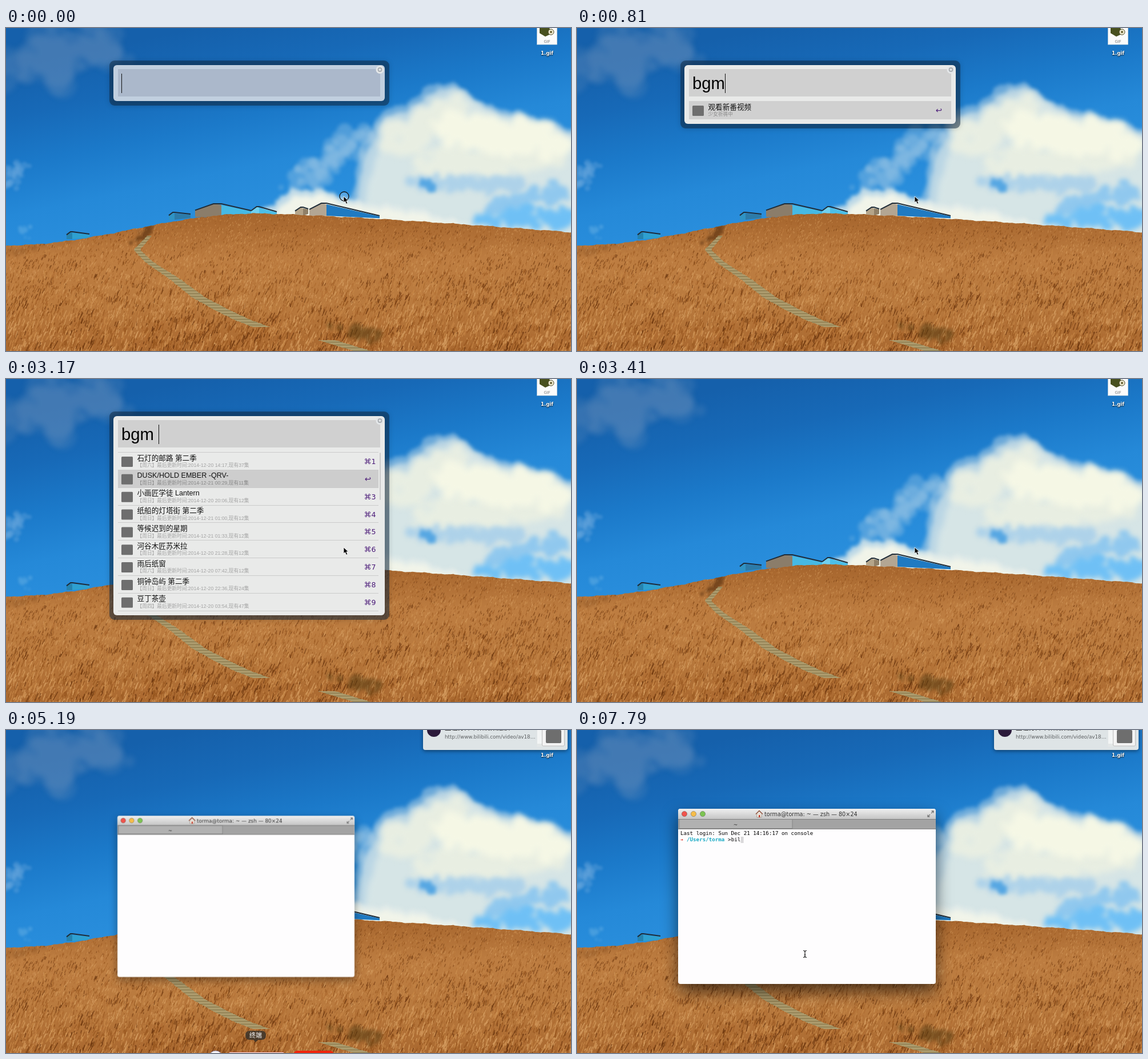
An HTML page with a canvas that plays this animation: 989x566 px, repeating every 8000 ms.

```html
<!DOCTYPE html>
<html lang="zh">
<head>
<meta charset="utf-8">
<title>Desktop</title>
<style>
html, body { margin: 0; width: 100%; height: 100%; overflow: hidden; background: #1c74c2; }
canvas, svg { position: absolute; left: 0; top: 0; width: 989px; height: 566px; }
text { font-family: "Liberation Sans", "Noto Sans CJK SC", "Noto Sans CJK", sans-serif; white-space: pre; }
.ui { font-family: "DejaVu Sans", "Noto Sans CJK SC", sans-serif; }
.mono { font-family: "DejaVu Sans Mono", monospace; font-size: 9.2px; }
.t { animation: 8s step-end -4ms infinite; }

/* search panel */
#panel { animation-name: panel; }
.band { x: 181px; y: 57px; width: 490px; height: calc(var(--h) + 16px); fill: rgba(14, 38, 62, .5); filter: drop-shadow(0 1px 4px rgba(0, 0, 0, .3)); }
.face { x: 188px; y: 65px; width: 475px; height: var(--h); fill: var(--face); }
.field { fill: var(--field); }
.query { font-size: 29.3px; }
#b { animation-name: key-b; } #g { animation-name: key-g; } #m { animation-name: key-m; }
#caret { animation-name: caret; }
#list { animation-name: list; } #single { animation-name: single; }
#sel { animation-name: sel; }
#r0 { animation-name: leave; } #r1 { animation-name: enter; }
.title { font-size: 12.6px; fill: #111; }
.sub { font-size: 8.7px; fill: var(--s, #a3a3a3); }
.short { font: 12.5px "DejaVu Sans", sans-serif; fill: #4a1a78; text-anchor: end; opacity: var(--k, 1); }
.ret { font: 13.5px "DejaVu Sans", sans-serif; fill: #4a1a78; }

@keyframes panel {
  0% { --h: 63px; --face: #c1cfdf; --field: #abb8cb; opacity: 1; }
  1.5% { --face: #e9eae9; --field: #d0d0d0; }
  5.25% { --h: 349px; }
  10.125% { --h: 103px; }
  12% { --h: 349px; }
  42.625% { opacity: 0; }
  100% { --h: 63px; --face: #e9eae9; --field: #d0d0d0; opacity: 0; }
}
@keyframes key-b { 0% { opacity: 0; } 5.25%, 100% { opacity: 1; } }
@keyframes key-g { 0% { opacity: 0; } 7.125%, 100% { opacity: 1; } }
@keyframes key-m { 0% { opacity: 0; } 8.625%, 100% { opacity: 1; } }
@keyframes caret {
  0% { transform: translateX(0); opacity: 1; }
  5.25% { transform: translateX(16.5px); }
  7.125% { transform: translateX(33px); }
  8.625% { transform: translateX(57px); }
  12% { transform: translateX(65px); }
  18.625% { opacity: 0; }
  26.125% { opacity: 1; }
  33.625% { opacity: 0; }
  39.625%, 100% { opacity: 1; transform: translateX(65px); }
}
@keyframes list { 0% { opacity: 0; } 5.25% { opacity: 1; } 10.125% { opacity: 0; } 12%, 100% { opacity: 1; } }
@keyframes single { 0% { opacity: 0; } 10.125% { opacity: 1; } 12%, 100% { opacity: 0; } }
@keyframes sel { 0% { transform: none; } 21.625%, 100% { transform: translateY(30.85px); } }
@keyframes leave { 0% { --k: 0; --s: #868686; } 21.625%, 100% { --k: 1; --s: #a3a3a3; } }
@keyframes enter { 0% { --k: 1; --s: #a3a3a3; } 21.625%, 100% { --k: 0; --s: #868686; } }

/* pointer */
#ring { animation-name: ring; } #arrow { animation-name: arrow; } #beam { animation-name: beam; }
@keyframes ring { 0% { opacity: 1; } 1.5%, 100% { opacity: 0; } }
@keyframes arrow {
  0% { transform: translate(591px, 295px); opacity: 1; }
  48.625% { transform: translate(584px, 434px); }
  50.5%, 100% { opacity: 0; transform: translate(584px, 434px); }
}
@keyframes beam { 0% { opacity: 0; } 72%, 100% { opacity: 1; } }

/* notification and dock */
#note { animation-name: note; } #dock { animation-name: dock; } #tip { animation-name: tip; }
.card { filter: drop-shadow(0 2px 3px rgba(0, 0, 0, .45)); }
@keyframes note {
  0% { transform: translateX(270px); }
  50.5% { transform: translateX(150px); }
  52% { transform: translateX(25px); }
  54.25%, 100% { transform: none; }
}
@keyframes dock {
  0% { transform: translateY(12px); }
  54.25% { transform: translateY(2px); }
  55.75% { transform: none; }
  72%, 100% { transform: translateY(12px); }
}
@keyframes tip { 0% { opacity: 0; } 58% { opacity: 1; } 70.125%, 100% { opacity: 0; } }

/* terminal */
#term { animation-name: term; transform-origin: 403px 292px; }
#frame { animation-name: shade; }
#login { animation-name: login; } #prompt { animation-name: prompt; }
#bi { animation-name: key-i; } #l { animation-name: key-l; } #block { animation-name: block; }
@keyframes term {
  0% { opacity: 0; transform: scale(.3); }
  61.875% { opacity: .5; }
  63.375% { opacity: .8; transform: scale(.65); }
  64.875% { opacity: 1; transform: scale(.92); }
  66.375%, 100% { opacity: 1; transform: none; }
}
@keyframes shade {
  0% { filter: drop-shadow(0 6px 8px rgba(0, 0, 0, .4)); }
  68.25%, 100% { filter: drop-shadow(0 13px 14px rgba(0, 0, 0, .6)); }
}
@keyframes login { 0% { opacity: 0; } 68.25%, 100% { opacity: 1; } }
@keyframes prompt { 0% { opacity: 0; } 70.125%, 100% { opacity: 1; } }
@keyframes key-i { 0% { opacity: 0; } 94.875%, 100% { opacity: 1; } }
@keyframes key-l { 0% { opacity: 0; } 97.375%, 100% { opacity: 1; } }
@keyframes block {
  0% { transform: none; }
  94.875% { transform: translateX(11px); }
  97.375%, 100% { transform: translateX(16.6px); }
}
</style>
</head>
<body>
<canvas id="scene" width="989" height="566"></canvas>
<svg viewBox="0 0 989 566">
  <defs>
    <linearGradient id="bar" x2="0" y2="1"><stop stop-color="#f0f0f0"/><stop offset="1" stop-color="#c2c2c2"/></linearGradient>
  </defs>

  <g id="file">
    <rect x="929.5" y="-10" width="35" height="39" fill="#fbfbfb" stroke="#c9d3da" stroke-width=".7"/>
    <path d="M934 0h17l6 9-13 6-10-6z" fill="#48501f"/>
    <circle cx="954" cy="7" r="5" fill="#eee9d0" stroke="#4e4a2a"/><circle cx="954" cy="7" r="2" fill="#6a6335"/>
    <text class="ui" x="947" y="26" font-size="6.8" fill="#777" text-anchor="middle">GIF</text>
    <text class="ui" x="947" y="47" font-size="8.6" font-weight="bold" fill="#fff" text-anchor="middle" style="text-shadow:0 1px 2px #000">1.gif</text>
  </g>

  <g id="panel" class="t">
    <rect class="band" rx="9"/>
    <rect class="face" rx="6"/>
    <rect class="field" x="196" y="72" width="459" height="48"/>
    <circle cx="654.5" cy="73" r="7" fill="#e4e7e9"/>
    <circle cx="654.5" cy="73" r="3" fill="none" stroke="#a9adb2" stroke-width="1.8"/>
    <g class="query">
      <text id="b" class="t" x="202" y="107">b</text>
      <text id="g" class="t" x="218.3" y="107">g</text>
      <text id="m" class="t" x="234.6" y="107">m</text>
    </g>
    <rect id="caret" class="t" x="202" y="80" width="1" height="34" fill="#111"/>
    <g id="single" class="t" style="--s:#8c8c8c;--k:0">
      <rect x="196" y="128" width="459" height="32" fill="#d0d0d0"/>
      <text class="ret" x="628" y="149">↩</text>
    </g>
    <g id="list" class="t">
      <g id="sel" class="t">
        <rect x="196" y="128.5" width="456" height="31" fill="#cdcdcd"/>
        <text class="ret" x="628" y="149">↩</text>
      </g>
      <rect x="654" y="129" width="2" height="83" rx="1" fill="#cacaca"/>
    </g>
  </g>

  <g id="dock" class="t">
    <circle cx="367" cy="574" r="12" fill="#f4f2f6" stroke="#8a7c98"/>
    <rect x="390" y="564.5" width="97" height="10" rx="2" fill="#f7f1ec" stroke="#b5402a" stroke-width=".8"/>
    <rect x="503" y="562" width="71" height="20" rx="7" fill="#f0240c"/>
  </g>
  <g id="tip" class="t">
    <path d="M427 527h20q8 0 8 8t-8 8h-6l-4 4-4-4h-6q-8 0-8-8t8-8z" fill="#3f362c" fill-opacity=".88"/>
    <text x="437" y="539" font-size="11" fill="#fff" text-anchor="middle">终端</text>
  </g>

  <g id="note" class="t">
    <rect class="card" x="730" y="-40" width="253" height="75" rx="4" fill="#e6eaea" fill-opacity=".97"/>
    <circle cx="749" cy="0" r="12" fill="#2b1a3a"/>
    <text x="768" y="-.5" font-size="11.4" fill="#222">正在打开本集视频播放</text>
    <text class="ui" x="768" y="14.5" font-size="8.8" fill="#5c5f61">http://www.bilibili.com/video/av18…</text>
    <rect x="930" y="-5" width="8" height="29" fill="#fff" fill-opacity=".6"/>
    <rect x="938.5" y="-12" width="39" height="40" rx="2" fill="#f3f3f3" stroke="#bcbcbc"/>
    <rect x="945" y="0" width="27" height="23" rx="2" fill="#6e6e6e"/>
  </g>

  <g id="term" class="t">
    <rect id="frame" class="t" x="177" y="138" width="451" height="307" rx="4" fill="#fefdfe"/>
    <path d="M177 157v-15q0-4 4-4h443q4 0 4 4v15z" fill="url(#bar)"/>
    <g stroke-opacity=".45" stroke="#333" stroke-width=".8">
      <circle cx="188" cy="147" r="4.6" fill="#f0544c"/>
      <circle cx="204" cy="147" r="4.6" fill="#f6bd4a"/>
      <circle cx="220" cy="147" r="4.6" fill="#7cc452"/>
    </g>
    <path d="M315 147h8v6h-8z" fill="#f6efe4" stroke="#8b8078" stroke-width=".7"/>
    <path d="M313 147.5l6-6 6 6" fill="#e9e2da" stroke="#8a4a35" stroke-width="1.4"/>
    <path d="M318 149h2.5v4h-2.5z" fill="#c0392b"/>
    <text class="ui" x="328" y="151" font-size="9.7" fill="#333">torma@torma: ~ — zsh — 80×24</text>
    <path d="M620 146l4-4m-3.5 0h3.5v3.5M618 148l-4 4m3.5 0h-3.5v-3.5" fill="none" stroke="#777" stroke-width="1.3"/>
    <rect x="177" y="156" width="451" height="18" fill="#a3a3a3"/>
    <rect x="179" y="156.5" width="198" height="16" fill="#b1b1b1" stroke="#7d7d7d" stroke-width=".8"/>
    <path d="M177 156.5h451M177 173.5h451" stroke="#808080"/>
    <text class="ui" x="277.5" y="169" font-size="9" fill="#333" text-anchor="middle">~</text>
    <text id="login" class="t mono" x="181" y="184">Last login: Sun Dec 21 14:16:17 on console</text>
    <g id="prompt" class="t">
      <rect id="block" class="t" x="270" y="187" width="5" height="11" fill="#d9d8da"/>
      <text class="mono" x="181" y="195" fill="#d8281e" font-weight="bold" style="font-size:8px">➜</text>
      <text class="mono" x="192" y="195" fill="#17a9c4" font-weight="bold">/Users/torma</text>
      <text class="mono" x="264" y="195">&gt;</text>
      <text id="bi" class="t mono" x="269.7" y="195">bi</text>
      <text id="l" class="t mono" x="280.8" y="195">l</text>
    </g>
  </g>

  <circle id="ring" class="t" cx="592" cy="295" r="8" fill="#fff" fill-opacity=".2" stroke="#111" stroke-width="1.3"/>
  <path id="arrow" class="t" d="M0 0v11l2.6-2.4 2 4.6 2.2-1-2-4.4h3.5z" fill="#000" stroke="#fff" stroke-width=".8"/>
  <path id="beam" class="t" d="M396 386.5q3 0 3 2.5 0-2.5 3-2.5M399 389v7M396 398.5q3 0 3-2.5 0 2.5 3 2.5M397.5 394h3" fill="none" stroke="#222" stroke-width="1.2"/>
</svg>

<script>
function add(parent, tag, attrs, text) {
  const el = document.createElementNS('http://www.w3.org/2000/svg', tag);
  for (const k in attrs) el.setAttribute(k, attrs[k]);
  if (text) el.textContent = text;
  return parent.appendChild(el);
}

// result rows
function addRow(parent, y, title, sub) {
  add(parent, 'rect', { x: 202, y: y + 8, width: 20, height: 18, rx: 1.5, fill: '#6e6e6e' });
  add(parent, 'text', { class: 'title', x: 229.5, y: y + 14.6 }, title);
  add(parent, 'text', { class: 'sub', x: 229.5, y: y + 26.2 }, sub);
}
const rows = [
  ['石灯的邮路 第二季', '周六', '20 14:17', 37],
  ['DUSK/HOLD EMBER -QRV-', '周日', '21 00:29', 11],
  ['小画匠学徒 Lantern', '周日', '20 20:06', 12],
  ['纸船的灯塔街 第二季', '周日', '21 01:00', 12],
  ['等候迟到的星期', '周日', '21 01:33', 12],
  ['河谷木匠苏米拉', '周日', '20 21:28', 12],
  ['雨后纸窗', '周六', '20 07:42', 12],
  ['铜钟岛屿 第二季', '周日', '20 22:36', 24],
  ['豆丁茶壶', '周四', '20 03:54', 47]
];
const list = document.getElementById('list');
for (let i = 0; i <= rows.length; i++) {
  add(list, 'path', { d: `M196 ${Math.round(128 + i * 30.85) + .5}h456`, stroke: '#cbcbcb' });
}
rows.forEach(([title, day, time, count], i) => {
  const y = 128 + i * 30.85, g = add(list, 'g', { id: 'r' + i, class: 't' });
  addRow(g, y, title, `【${day}】最后更新时间:2014-12-${time},现有${count}集`);
  add(g, 'text', { class: 'short', x: 647.5, y: y + 21 }, '⌘' + (i + 1));
});
addRow(document.getElementById('single'), 128, '观看新番视频', '少女祈祷中');

// wallpaper
const W = 989, H = 566;
const c = document.getElementById('scene').getContext('2d');
const { sin, cos, min, max, floor, PI } = Math;
let seed = 11;
const rnd = () => (seed = (seed * 16807) % 2147483647) / 2147483647;
const rough = x => sin(x * .11) + .7 * sin(x * .27 + 1) + .5 * sin(x * .63 + 2);

// value at x on a line through [x, y] keys
function through(keys, x) {
  let i = 1;
  while (i < keys.length - 1 && keys[i][0] < x) i++;
  const [x0, y0] = keys[i - 1], [x1, y1] = keys[i];
  return y0 + (y1 - y0) * (x - x0) / (x1 - x0);
}
function gradient(x0, y0, x1, y1, ...stops) {
  const g = c.createLinearGradient(x0, y0, x1, y1);
  stops.forEach((s, i) => g.addColorStop(i / (stops.length - 1), s));
  return g;
}
function paint(fill, blur, trace) {
  c.filter = blur ? `blur(${blur}px)` : 'none';
  c.fillStyle = fill;
  c.beginPath();
  trace();
  c.fill();
  c.filter = 'none';
}
// cloud bank below a ragged ridge
function bank(fill, blur, keys, dx, dy) {
  paint(fill, blur, () => {
    const start = keys[0][0];
    for (let x = start; x < W + 20; x += 3) c.lineTo(x + dx + 2 * rough(x * 2 + dy), through(keys, x) + dy + 2.5 * rough(x + dx));
    c.lineTo(W + 60, 380);
    c.lineTo(start + dx, 380);
  });
}
// loose puffs scattered between two [x, y, radius] ends
function puffs(fill, blur, n, [x0, y0, r0], [x1, y1, r1]) {
  paint(fill, blur, () => {
    for (let i = 0; i < n; i++) {
      const t = rnd(), a = rnd() * 2 * PI, r = r0 + (r1 - r0) * t, d = r * rnd(), s = r * (.15 + .3 * rnd());
      const x = x0 + (x1 - x0) * t + 1.3 * d * cos(a), y = y0 + (y1 - y0) * t + .8 * d * sin(a);
      c.moveTo(x + s, y);
      c.arc(x, y, s, 0, 7);
    }
  });
}

// sky
c.fillStyle = gradient(330, 0, 400, 335, '#1560ab', '#1769b7', '#1b79c9', '#2589d8', '#2a8fdd');
c.fillRect(0, 0, W, H);
for (let i = 0; i < 3; i++) {
  puffs('rgba(115,152,188,.2)', 5, 35, [10, 70, 75], [165, 30, 55]);
  puffs('rgba(125,180,224,.3)', 2, 12, [4, 275, 14], [24, 238, 18]);
}
puffs('rgba(120,185,230,.4)', 2, 12, [32, 345, 9], [38, 362, 12]);

// clouds
const ridge = [[600, 312], [624, 205], [655, 152], [715, 126], [748, 97], [790, 101], [830, 134], [900, 150], [989, 178]];
const low = [[452, 320], [500, 285], [545, 284], [610, 305], [720, 318], [800, 342]];
for (let i = 0; i < 3; i++) puffs('rgba(150,195,228,.4)', 3, 40, [510, 272, 26], [635, 185, 32]);
bank('rgba(170,205,228,.55)', 3, ridge, 0, -2);
bank('rgba(205,224,230,.8)', 4, ridge, 8, 7);
bank('#d6e5e6', 6, ridge, 22, 20);
puffs('#e8eee2', 6, 90, [700, 210, 42], [775, 130, 26]);
puffs('#e8eee2', 6, 120, [720, 240, 30], [960, 225, 36]);
puffs('#f5f7e5', 6, 160, [775, 175, 36], [960, 200, 36]);
puffs('#aed2e9', 4, 80, [725, 275, 22], [900, 275, 24]);
puffs('#90c8ee', 4, 60, [850, 315, 24], [980, 285, 24]);
puffs('#6fc0f5', 5, 70, [825, 338, 20], [985, 330, 28]);
puffs('#55a6e2', 3, 22, [728, 272, 12], [748, 278, 14]);
bank('rgba(225,235,234,.8)', 3, low, 0, -2);
bank('#f1f4e9', 4, low, 8, 8);

// huts: gable end, long wall and a dark roof line
function hut(x, y, front, side, h, drop, wall, gable) {
  const corner = x + front, end = corner + side, apex = x + front * .7, top = y - h;
  paint(gable, 0, () => {
    c.moveTo(x, y + 4); c.lineTo(x, y - h * .4); c.lineTo(apex, top); c.lineTo(corner, top + 2); c.lineTo(corner, y + 4);
  });
  paint(wall, 0, () => {
    c.moveTo(corner, y + 4); c.lineTo(corner, top + 2); c.lineTo(end, top + 2 + drop); c.lineTo(end, y + drop * .4);
  });
  c.strokeStyle = '#1f2c38';
  c.lineWidth = 2;
  c.beginPath();
  c.moveTo(x, y - h * .4); c.lineTo(apex, top); c.lineTo(corner, top); c.lineTo(end, top + drop + 1);
  c.stroke();
}
hut(331, 327, 46, 52, 19, 11, '#46b9e4', '#8b7d6a');
hut(429, 325, 14, 31, 12, 8, '#4cbfe8', '#6fd0f0');
hut(285, 332, 10, 28, 9, 2, '#2d7ba8', '#2f93c4');
hut(106, 366, 10, 30, 9, 3, '#2ea0d0', '#2583b0');
hut(506, 325, 14, 9, 11, 2, '#8f8068', '#b5a58a');
hut(531, 325, 30, 93, 18, 21, '#1f7ac2', '#b3a693');

// hill
const crest = x => rough(x) * .5 + (x < 440
  ? 325 + 28 * (1 - cos(PI * (440 - x) / 440))
  : 325 + 33 * ((x - 440) / 549) ** 1.3);
c.save();
paint(gradient(0, 325, 0, H, '#a5642c', '#bd7d41', '#b97a3e', '#a9682f'), 0, () => {
  for (let x = 0; x <= W + 3; x += 3) c.lineTo(x, crest(x));
  c.lineTo(W, H);
  c.lineTo(0, H);
});
c.clip();

const tones = ['#6e3810', '#97561f', '#b06d33', '#c78848', '#d59d60'];
for (let i = 0; i < 15000; i++) {
  const x = rnd() * W, y = 322 + rnd() * 256, depth = (y - 320) / 246;
  const clump = sin(x / 41 + 3 * sin(y / 29)) * sin(y / 11 + 2 * sin(x / 57)) + .5 * sin(x / 13 + y / 9);
  const tone = floor((.14 + .78 * rnd() + .2 * clump) * 5);
  const len = 2 + depth * 13 * rnd();
  c.globalAlpha = .5 + .3 * depth;
  c.strokeStyle = tones[max(0, min(4, tone))];
  c.lineWidth = 1 + depth * .6;
  c.beginPath();
  c.moveTo(x, y);
  c.lineTo(x + len * (.1 + rnd() * .5), y - len);
  c.stroke();
}
c.globalAlpha = 1;
puffs('rgba(80,44,14,.6)', 2, 40, [222, 380, 8], [255, 348, 9]);
puffs('rgba(92,48,14,.35)', 3, 40, [0, 394, 9], [125, 371, 4]);
puffs('rgba(72,52,14,.5)', 3, 50, [575, 522, 14], [645, 540, 16]);

// footpath laid as slats
const trail = [[364, 250], [388, 228], [410, 250], [442, 298], [470, 334], [492, 374], [511, 413], [523, 445]];
for (let y = 364; y < H; y++) {
  const lower = y > 546, half = lower ? 15 : 4 + (y - 364) * .07;
  if (y > 523 && !lower) continue;
  const x = lower ? 562 + (y - 547) * 3.3 : through(trail, y);
  c.fillStyle = y % 5 ? '#ab9a6c' : '#857448';
  c.fillRect(x - half + rnd() * 2, y, half * 2, 1);
}
c.restore();
</script>
</body>
</html>
```
